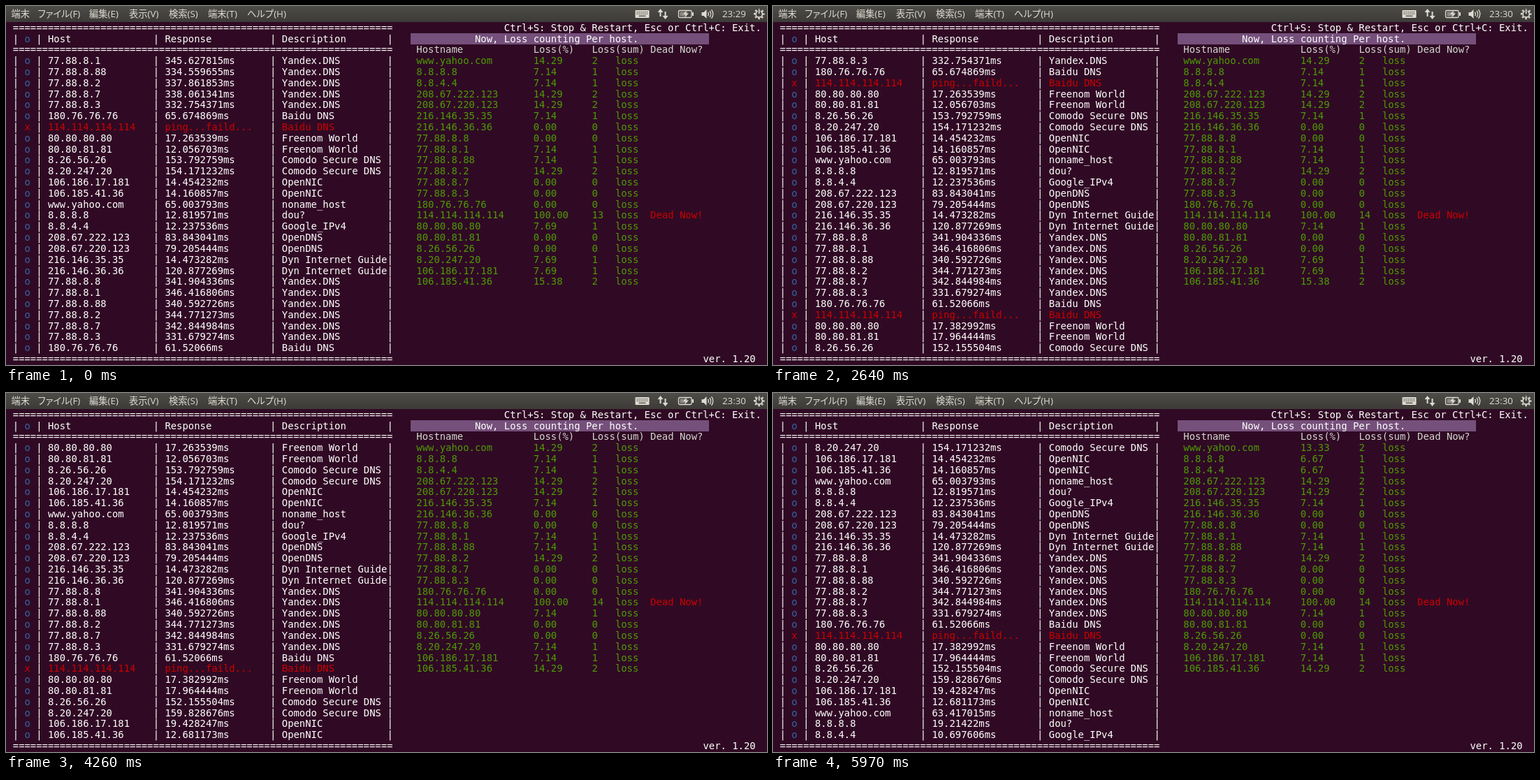
These frames come from a looping animation (1089 px wide and 514 px high, 8000 ms). An HTML page:

```html
<!DOCTYPE html>
<html lang="ja">
<head>
<meta charset="utf-8">
<title>Ping monitor</title>
<style>
html, body { margin: 0; width: 100%; height: 100%; overflow: hidden; background: #300a24; }
#stage { position: relative; width: 1089px; height: 514px; overflow: hidden; background: #300a24; }
#bar { position: absolute; left: 0; top: 0; width: 1089px; height: 22.5px;
  background: linear-gradient(#4d4c47, #3c3b37); color: #dfdbd2;
  font: 13.3px/22px "Open Sans", "Noto Sans CJK JP", "Noto Sans CJK", sans-serif;
  font-feature-settings: "palt"; }
#bar span { position: absolute; top: 0; white-space: pre; }
#bar svg { position: absolute; left: 0; top: 0; }
#term span { position: absolute; white-space: pre; color: #fff;
  font: 13.9px/15.81px "DejaVu Sans Mono", monospace; }
#term .blue { color: #3465a4; }
#term .red { color: #cc0000; }
#term .green { color: #4e9a06; }
#term .grey { color: #d3d7cf; }
#title { position: absolute; left: 579px; top: 39.3px; width: 426.8px; height: 15.8px; background: #75507b; }
</style>
</head>
<body>
<div id="stage">
  <div id="bar">
    <svg width="1089" height="23" fill="none" stroke="#dfdbd2">
      <rect x="900.5" y="6" width="20" height="11" rx="1" fill="#dfdbd2" stroke="none"/>
      <path d="M902.5 8.7h16.5M902.5 11.4h16.5" stroke="#45443f" stroke-width="1.3" stroke-dasharray="1.6 1.2"/>
      <path d="M905.5 14.3h10" stroke="#45443f" stroke-width="1.3"/>
      <path d="M936.5 15V6M943.5 8v9" stroke-width="2"/>
      <path d="M932.5 9l4-5 4 5zM939.5 14l4 5 4-5z" fill="#dfdbd2" stroke="none"/>
      <rect x="962.5" y="6.5" width="18.5" height="10" rx="1.5" stroke-width="1.3"/>
      <path d="M982 9h2v5h-2z" fill="#dfdbd2" stroke="none"/>
      <path d="M964.5 8.5h11l-3 6h-8z" fill="#8d8b84" stroke="none"/>
      <path d="M974 6l-5 6h3.500l-1.500 5 6-6.500h-4z" fill="#dfdbd2" stroke="none"/>
      <path d="M995.500 9h3l4-4v13l-4-4h-3z" fill="#dfdbd2" stroke="none"/>
      <path d="M1004.500 8.800q2 2.700 0 5.400M1007 7q3.400 4.500 0 9M1009.500 5.200q4.800 6.300 0 12.600" stroke-width="1.300"/>
      <circle cx="1077.700" cy="11.500" r="4.700" stroke-width="1.700"/>
      <circle cx="1077.700" cy="11.500" r="6.600" stroke-width="2.300" stroke-dasharray="2.400 2.784" transform="rotate(-10 1077.700 11.500)"/>
      <path d="M1077.700 4v7" stroke="#45443f" stroke-width="4"/>
      <path d="M1077.700 4.500v6.500" stroke-width="1.700"/>
    </svg>
  </div>
  <div id="title"></div>
  <div id="term"></div>
</div>
<script>
const LOOP = 8000, ROWS = 27, CELL = 8.37, LINE = 15.81, LEFT = 1.4, TOP = 23.7;
const CLOCK_AT = 280;
const SCROLLS = [1170, 1610, 2170, 2640, 3200, 3820, 4260, 4970, 5380, 5970];

// host, description, losses
const HOSTS = `www.yahoo.com,noname_host,2
8.8.8.8,dou?,1
8.8.4.4,Google_IPv4,1
208.67.222.123,OpenDNS,2
208.67.220.123,OpenDNS,2
216.146.35.35,Dyn Internet Guide,1
216.146.36.36,Dyn Internet Guide,0
77.88.8.8,Yandex.DNS,0
77.88.8.1,Yandex.DNS,1
77.88.8.88,Yandex.DNS,1
77.88.8.2,Yandex.DNS,2
77.88.8.7,Yandex.DNS,0
77.88.8.3,Yandex.DNS,0
180.76.76.76,Baidu DNS,0
114.114.114.114,Baidu DNS,13
80.80.80.80,Freenom World,1
80.80.81.81,Freenom World,0
8.26.56.26,Comodo Secure DNS,0
8.20.247.20,Comodo Secure DNS,1
106.186.17.181,OpenNIC,1
106.185.41.36,OpenNIC,2`.split("\n").map(l => l.split(","));

const FIRST = 8, DEAD = 14;
const PINGS = `345.627815 334.559655 337.861853 338.061341 332.754371 65.674869 x
17.263539 12.056703 153.792759 154.171232 14.454232 14.160857 65.003793
12.819571 12.237536 83.843041 79.205444 14.473282 120.877269 341.904336
346.416806 340.592726 344.771273 342.844984 331.679274 61.52066 x
17.382992 17.964444 152.155504 159.828676 19.428247 12.681173 63.417015
19.21422 10.697606`.split(/\s+/);

const bar = document.getElementById("bar");
const term = document.getElementById("term");

function label(x, text) {
  const el = document.createElement("span");
  el.style.left = x + "px";
  el.textContent = text;
  return bar.appendChild(el);
}

[[7.5, "端末"], [45.5, "ファイル(F)"], [119, "編集(E)"], [176, "表示(V)"],
 [233, "検索(S)"], [289, "端末(T)"], [345, "ヘルプ(H)"]].forEach(m => label(...m));
const clock = label(1025, "");

function put(row, col, text, cls = "") {
  const el = document.createElement("span");
  el.className = cls;
  el.style.left = LEFT + col * CELL + "px";
  el.style.top = TOP + row * LINE + "px";
  el.textContent = text;
  term.append(el);
}

function tableRow(row, failed, cells, cls) {
  [1, 5, 25, 45, 65].forEach(col => put(row, col, "|"));
  put(row, 3, failed ? "x" : "o", failed ? "red" : "blue");
  cells.forEach((text, i) => put(row, 7 + 20 * i, text, cls));
}

function drawLeft(step) {
  [0, 2, 30].forEach(row => put(row, 1, "=".repeat(65)));
  tableRow(1, PINGS[step + ROWS - 1] === "x", ["Host", "Response", "Description"]);
  for (let i = 0; i < ROWS; i++) {
    const n = step + i, failed = PINGS[n] === "x";
    const [host, about] = HOSTS[(FIRST + n) % HOSTS.length];
    const reply = failed ? "ping...faild..." : PINGS[n] + "ms";
    tableRow(3 + i, failed, [host, reply, about], failed ? "red" : "");
  }
}

function drawRight(step) {
  put(0, 85, "Ctrl+S: Stop & Restart, Esc or Ctrl+C: Exit.");
  put(1, 80, "Now, Loss counting Per host.");
  [[70, "Hostname"], [90, "Loss(%)"], [100, "Loss(sum)"], [110, "Dead Now?"]]
    .forEach(([col, text]) => put(2, col, text, "grey"));
  HOSTS.forEach(([host, , losses], i) => {
    // each scroll adds one ping, beginning with the dead host
    const turn = (i - DEAD + HOSTS.length) % HOSTS.length;
    const fresh = turn < step ? 1 : 0;
    const sent = (i < DEAD ? 14 : 13) + fresh;
    const lost = +losses + (i === DEAD ? fresh : 0);
    const row = 3 + i;
    put(row, 70, host, "green");
    put(row, 90, (lost / sent * 100).toFixed(2), "green");
    put(row, 100, String(lost), "green");
    put(row, 104, "loss", "green");
    if (i === DEAD) put(row, 110, "Dead Now!", "red");
  });
  put(30, 119, "ver. 1.20");
}

let shown = -1;
function frame() {
  const t = performance.now() % LOOP;
  clock.textContent = t < CLOCK_AT ? "23:29" : "23:30";
  const step = SCROLLS.filter(at => at <= t).length;
  if (step !== shown) {
    shown = step;
    term.textContent = "";
    drawLeft(step);
    drawRight(step);
  }
  requestAnimationFrame(frame);
}
frame();
</script>
</body>
</html>
```
